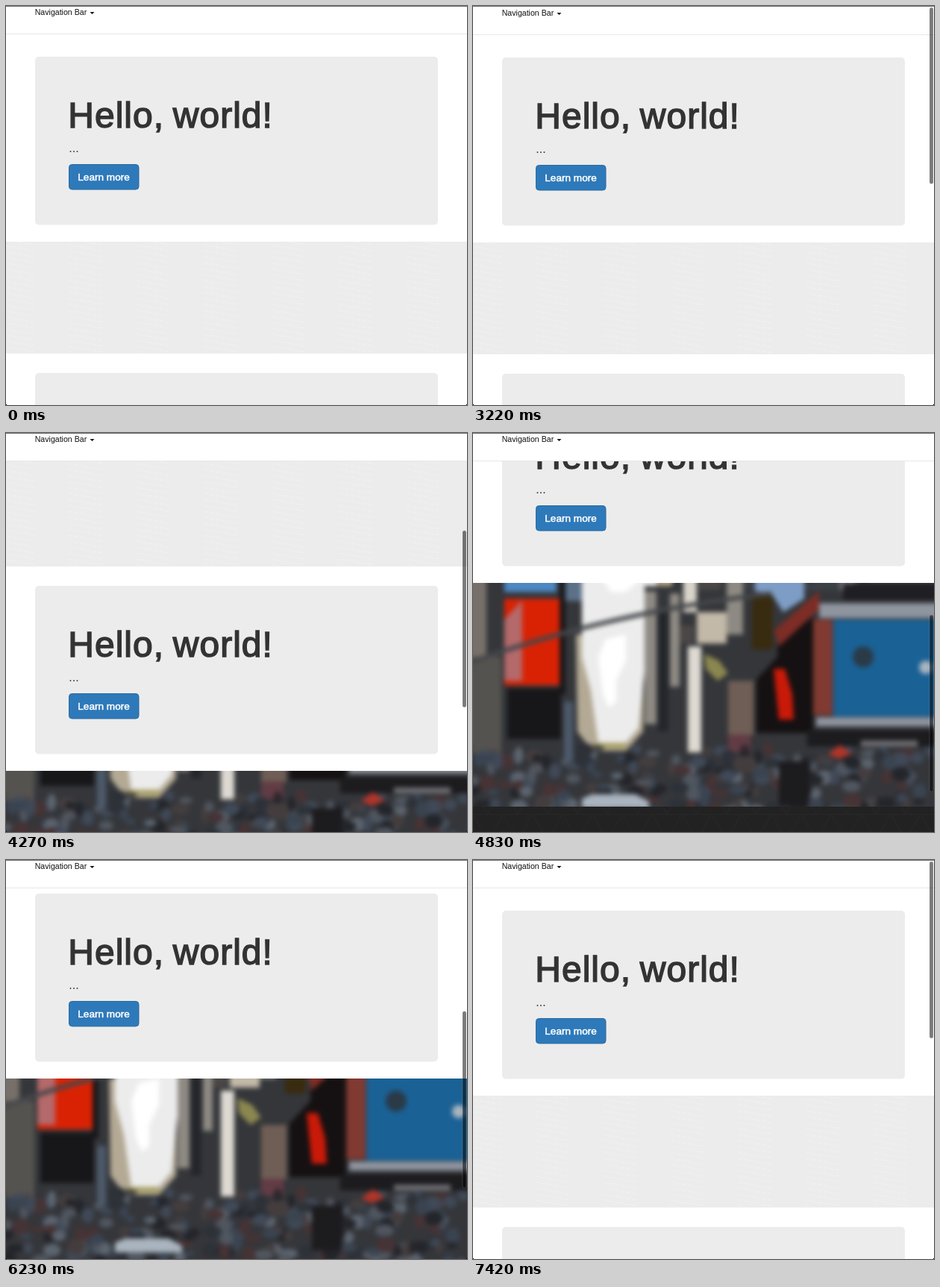
An HTML page that plays this animation: 618 px wide and 535 px high, repeating every 8120 ms.

```html
<!DOCTYPE html>
<html lang="en">
<head>
<meta charset="utf-8">
<title>Parallax page</title>
<style>
  html, body { margin: 0; width: 100%; height: 100%; overflow: hidden; background: #fff; }
  svg { display: block; }
  text { font-family: "Liberation Sans", Arial, sans-serif; }
  .title { font-size: 48px; letter-spacing: 1px; word-spacing: -2.5px; fill: #333; stroke: #333; stroke-width: 1.5px; }
  .label { font-size: 13.6px; fill: #fff; stroke: #fff; stroke-width: .5px; }
</style>
</head>
<body>
<svg width="618" height="535" viewBox="0 0 618 535">
  <defs>
    <filter id="soft" filterUnits="userSpaceOnUse" x="-20" y="90" width="660" height="450" color-interpolation-filters="sRGB">
      <feGaussianBlur stdDeviation="3.4"/>
    </filter>
    <pattern id="hatch" width="90.6" height="8" patternUnits="userSpaceOnUse" patternTransform="translate(-7 0)">
      <path d="M0 0L45 8" stroke="#f1f1f1" stroke-dasharray="6 2"/>
    </pattern>
    <pattern id="mesh" width="40" height="35" patternUnits="userSpaceOnUse">
      <path d="M0 0L20 35L40 0M0 .5H40" fill="none" stroke="#272727"/>
    </pattern>
    <g id="hero">
      <rect x="39" y="68" width="540" height="225.5" rx="5" fill="#ececec"/>
      <text class="title" x="83.3" y="163.3">Hello, world!</text>
      <text x="84.3" y="196" font-size="16" fill="#333">...</text>
      <rect x="84.5" y="212.5" width="93.5" height="33.5" rx="4" fill="#2e79b9" stroke="#2a6ba3"/>
      <text class="label" x="96.3" y="234">Learn more</text>
    </g>
  </defs>
  <rect width="618" height="535" fill="#fff"/>

  <g id="page">
    <use href="#hero"/>
    <rect y="316" width="618" height="150" fill="#ececec"/>
    <rect y="316" width="618" height="150" fill="url(#hatch)"/>
    <use href="#hero" y="424"/>

    <svg y="740" width="618" height="300">
      <g id="photo"><g filter="url(#soft)">
        <path fill="#34363a" d="M-20 90H640V540H-20z"/>
        <!-- left buildings and signs -->
        <path fill="#77706a" d="M-20 90H18V300H-20z"/>
        <path fill="#55534f" d="M-20 300H38V430H-20z"/>
        <path fill="#0b3796" d="M40 90H110V176H40z"/>
        <circle cx="57" cy="140" r="12" fill="#a9a3b4"/>
        <path fill="#4d88c2" d="M42 178H112V213H42z"/>
        <path fill="#d92204" d="M42 222H116V338H42z"/>
        <path fill="#b4696a" d="M42 250L66 224V332H42z"/>
        <path fill="#17171a" d="M46 342H118V410H46zM116 90H124V350H116z"/>
        <path fill="#5c7188" d="M124 90H146V225H124z"/>
        <path fill="#4c5a6b" d="M122 360H134V440H122z"/>
        <!-- bright tower -->
        <path fill="#b3a994" d="M138 270H228V400L205 426H160L140 400z"/>
        <path fill="#ececec" d="M146 90H247V205H230V320L222 395L204 416H168L158 345L146 300z"/>
        <path fill="#fff" d="M152 90H243V180L205 213H185L152 165zM178 276L205 270V305L192 332V360L182 368L174 350L168 300z"/>
        <path fill="#a8a068" d="M162 415H206V423H162z"/>
        <!-- middle buildings -->
        <path fill="#b3a782" d="M248 90H286V150L266 205H248z"/>
        <path fill="#d9d5ca" d="M276 90H340V142H300V240H282V165z"/>
        <path fill="#8e8a83" d="M230 212H246V390H230zM264 215H277V340H264zM340 90H362V270H340z"/>
        <path fill="#24262b" d="M248 235H262V400H248z"/>
        <path fill="#c2b9a8" d="M300 240H340V282H300z"/>
        <path fill="#4b4746" d="M303 175H332V210H303zM278 258H296V282H278z"/>
        <path fill="#dedad2" d="M288 286H306V428H288z"/>
        <path fill="#8b8750" d="M310 296L330 305L342 322L328 332L312 316z"/>
        <path fill="#6f5e55" d="M342 332H376V405H342z"/>
        <path fill="#623c45" d="M342 404H372V428H342z"/>
        <path fill="#3c4148" d="M362 90H492V210H362z"/>
        <path fill="#5c4d16" d="M366 124H456V137H366z"/>
        <path fill="#1f242b" d="M376 140H384V190H376zM400 140H408V180H400zM424 140H432V180H424zM448 140H456V200H448z"/>
        <path fill="#7d9dc6" d="M378 190L444 176V222L416 240L400 215L378 212z"/>
        <path fill="#382b10" d="M374 218H402V290H374z"/>
        <path fill="#151112" d="M408 278L456 246V402H380V330L408 300z"/>
        <path fill="#7d2d25" d="M404 264L464 212V236L410 286z"/>
        <path fill="#c91a09" d="M403 316H418L428 350L430 384H410z"/>
        <!-- right side -->
        <path fill="#74737f" d="M490 90H530V190L492 212z"/>
        <path fill="#eea3c9" d="M530 90H640V196H530z"/>
        <path fill="#fbe3ee" d="M536 110H550V190H536zM584 115H602V140H584z"/>
        <path fill="#ee4d6d" d="M576 150H640V182L600 186z"/>
        <path fill="#1f1e22" d="M496 202H640V224H496z"/>
        <path fill="#8f959f" d="M464 228H640V248H464zM460 381H640V393H460z"/>
        <path fill="#803a32" d="M456 250H482V378H456z"/>
        <path fill="#1a6195" d="M483 250H640V380H483z"/>
        <circle cx="523" cy="300" r="14" fill="#2a3a47"/>
        <circle cx="607" cy="314" r="9" fill="#aab6c0"/>
        <path fill="none" stroke="#45474b" stroke-width="6" d="M-20 313Q180 240 400 215"/>
        <!-- street -->
        <g id="crowd" opacity=".7"></g>
        <path fill="#1c1b1e" d="M448 398H640V420H448zM410 440H450V500H410z"/>
        <path fill="#b0352a" d="M476 430L492 418L508 430L490 437z"/>
        <path fill="#6c6c71" d="M520 412H596V420H520z"/>
        <path fill="#a9b4bf" d="M146 490L160 484H218L236 494V503H146z"/>
      </g></g>
    </svg>

    <rect y="1040" width="618" height="150" fill="#222"/>
    <rect y="1040" width="618" height="150" fill="url(#mesh)"/>
  </g>

  <g id="nav">
    <rect y="-40" width="618" height="78" fill="#fff"/>
    <rect y="37" width="618" height="1" fill="#e7e7e7"/>
    <text x="38.7" y="12" font-size="10.6" fill="#111">Navigation Bar</text>
    <path d="M112.5 8h6l-3 3z" fill="#111"/>
  </g>
  <rect id="bar" x="612" width="5" rx="2.5" fill="#000" fill-opacity=".52" stroke="#fff" stroke-opacity=".15"/>
  <rect width="618" height="1" fill="#707070"/>
  <path d="M0 534h1v1h-1zM617 534h1v1h-1z"/>
</svg>
<script>
  const LOOP = 8120, STEP = 70, MAX = 655, SHOW_BAR = 3220;
  const $ = id => document.getElementById(id);

  // [time in ms, scroll offset]; values outside 0..MAX are elastic overscroll
  const path = [
    [3220, -1], [3360, 2], [3640, 38], [3990, 155], [4270, 287], [4550, 420],
    [4830, 539], [5040, 624], [5180, 667], [5250, 668], [5390, 659], [5600, 655],
    [5670, 655], [5740, 656], [5880, 630], [6230, 447], [6580, 215], [6860, 50],
    [7070, -9], [7210, -6], [7350, -1], [7420, 0]
  ];

  function slope(i) {
    const a = path[Math.max(i - 1, 0)], b = path[Math.min(i + 1, path.length - 1)];
    return (b[1] - a[1]) / (b[0] - a[0]);
  }

  function scrollAt(t) {
    if (t < path[0][0] || t >= path[path.length - 1][0]) return 0;
    const i = path.findIndex(p => p[0] > t) - 1;
    const [t0, y0] = path[i], [t1, y1] = path[i + 1];
    const d = t1 - t0, u = (t - t0) / d, v = 1 - u;
    return v * v * (1 + 2 * u) * y0 + u * u * (3 - 2 * u) * y1
      + d * u * v * (v * slope(i) - u * slope(i + 1));
  }

  function buildCrowd() {
    const tones = ["#2b3038", "#465264", "#5c6470", "#1d1f24", "#4b4040", "#3d4a5c", "#6d7886", "#4e3234"];
    let seed = 11;
    const rnd = () => (seed = (seed * 16807) % 2147483647) / 2147483647;
    let out = "";
    for (let i = 0; i < 260; i++) {
      const x = rnd() * 640 - 10, y = 422 + rnd() * 106;
      const tone = tones[Math.floor(rnd() * tones.length)];
      out += `<ellipse cx="${x}" cy="${y}" rx="${5 + rnd() * 8}" ry="${4 + rnd() * 8}" fill="${tone}"/>`;
    }
    $("crowd").innerHTML = out;
  }

  function shift(id, y) {
    $(id).setAttribute("transform", `translate(0 ${y})`);
  }

  function draw(t) {
    const s = Math.round(scrollAt(t));
    const inside = Math.min(Math.max(s, 0), MAX), over = s - inside;
    shift("page", -s);
    shift("nav", -over);
    shift("photo", 0.75 * inside - 605);
    const bar = $("bar"), squeeze = Math.abs(over) / 2;
    bar.setAttribute("y", 2 + inside * 0.449 + (over > 0 ? squeeze : 0));
    bar.setAttribute("height", 237 - squeeze);
    bar.style.display = t < SHOW_BAR ? "none" : "";
  }

  buildCrowd();
  const start = performance.now();
  let last = -1;
  function tick() {
    const t = Math.floor(((performance.now() - start) % LOOP) / STEP) * STEP;
    if (t !== last) draw(last = t);
    requestAnimationFrame(tick);
  }
  tick();
</script>
</body>
</html>
```
